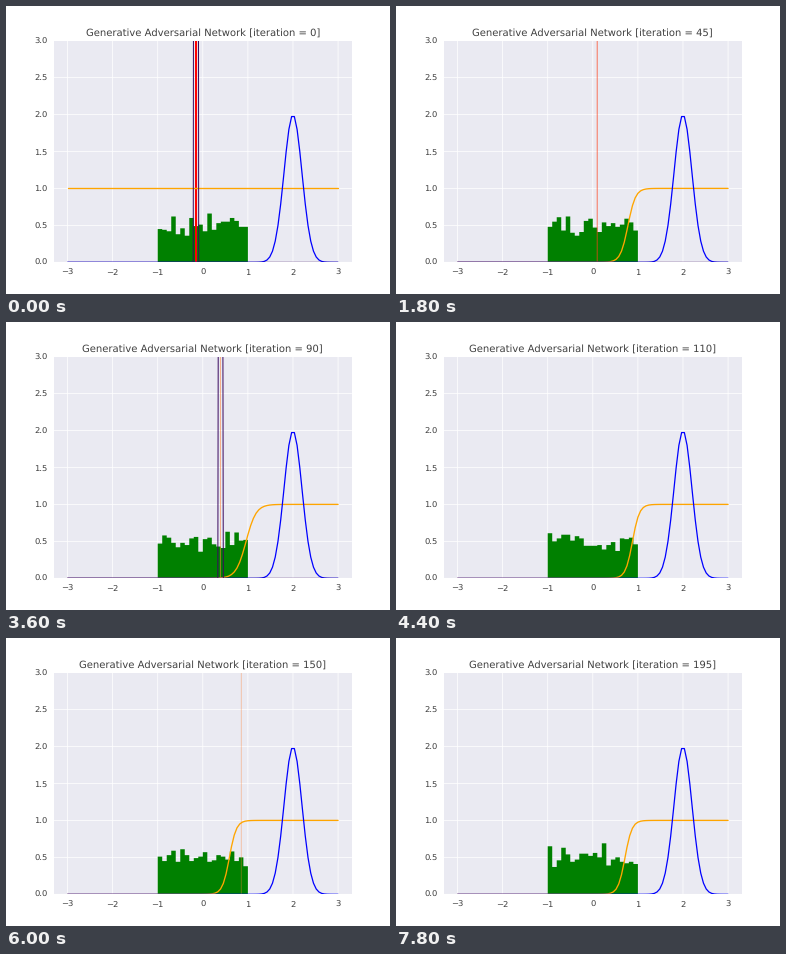
Write a matplotlib script that moves like this. It is 384 px wide and 288 px high and loops after 8000 ms.

```python
import numpy as np
import matplotlib.pyplot as plt
from matplotlib.animation import FuncAnimation

FRAMES, INTERVAL, STEP = 40, 200, 5
LAST = (FRAMES - 1) * STEP
BINS = np.linspace(-1, 1, 21)

plt.rcParams.update({
    "font.family": "DejaVu Sans",
    "text.hinting": "none",
    "text.color": "0.25",
    "xtick.color": "0.25",
    "ytick.color": "0.25",
    "axes.facecolor": "#eaeaf2",
    "axes.linewidth": 0,
    "axes.axisbelow": True,
    "lines.solid_capstyle": "round",
})

# Discriminator threshold and steepness, linear between a few iterations
ITERS = [0, 20, 45, 90, 110, 150, 195]
CENTER = [-8, -1.4, 0.78, 0.96, 0.88, 0.59, 0.715]
SLOPE = [4, 1.6, 12, 9, 13, 13, 13]


def normal(x, mean, std):
    return np.exp(-0.5 * ((x - mean) / std) ** 2) / (std * np.sqrt(2 * np.pi))


def decision(x, it):
    center = np.interp(it, ITERS, CENTER)
    slope = np.interp(it, ITERS, SLOPE)
    # the response saturates a fixed distance past the threshold
    return 1 / (1 + np.exp(-slope * np.minimum(x - center, 2.3)))


def noise(it):
    z = np.random.default_rng(it).uniform(-1, 1, 1000)
    return np.histogram(z, BINS, density=True)[0]


def generator(it):
    mean = -0.15 + 0.005 * it + 1.13e-5 * it ** 2
    std = 0.001 + 0.0085 * np.exp(-(it / 22.7) ** 2)
    return mean, std


def sample_color(it):
    """Solid red at first, then a flickering line that fades to orange."""
    warm = min(it / 90, 1)
    if it < 30:
        alpha = 1
    else:
        alpha = 0.8 * np.sqrt(1 - it / LAST) * (it % 15 == 0)
    return 1, 0.5 * warm * (it >= 30), 0.2 * warm * (it >= 30), alpha


x = np.linspace(-3, 3, 100)
fig, ax = plt.subplots(figsize=(6.4, 4.8), dpi=60)
ax.set(xlim=(-3.3, 3.3), ylim=(0, 3))
ax.grid(color="white", linestyle="-", linewidth=0.9, snap=False)
ax.tick_params(length=0, pad=8, labelsize=10)
title = ax.set_title("", fontsize=12)

hist = ax.stairs(np.zeros(20), BINS, fill=True, color="green",
                 linewidth=0, snap=False)
sample, = ax.plot([0, 0], [0, 3], solid_capstyle="butt", snap=False, zorder=2)
judge, = ax.plot(x, 0 * x, color="orange", lw=1.6)
ax.plot(x, normal(x, 2, 0.2), color="blue", lw=1.5)
fake, = ax.plot(x, 0 * x, color="#3a0a60", lw=1.2)


def draw(i):
    it = i * STEP
    mean, std = generator(it)
    title.set_text(f"Generative Adversarial Network [iteration = {it}]")
    hist.set_data(noise(it))
    sample.set_xdata([mean, mean])
    sample.set_color(sample_color(it))
    sample.set_linewidth(1 + 160 * std)
    fake.set_ydata(normal(x, mean, std))
    judge.set_ydata(decision(x, it))
    return title, hist, sample, fake, judge


anim = FuncAnimation(fig, draw, frames=FRAMES, interval=INTERVAL,
                     repeat=True, repeat_delay=0)
plt.show()
```
